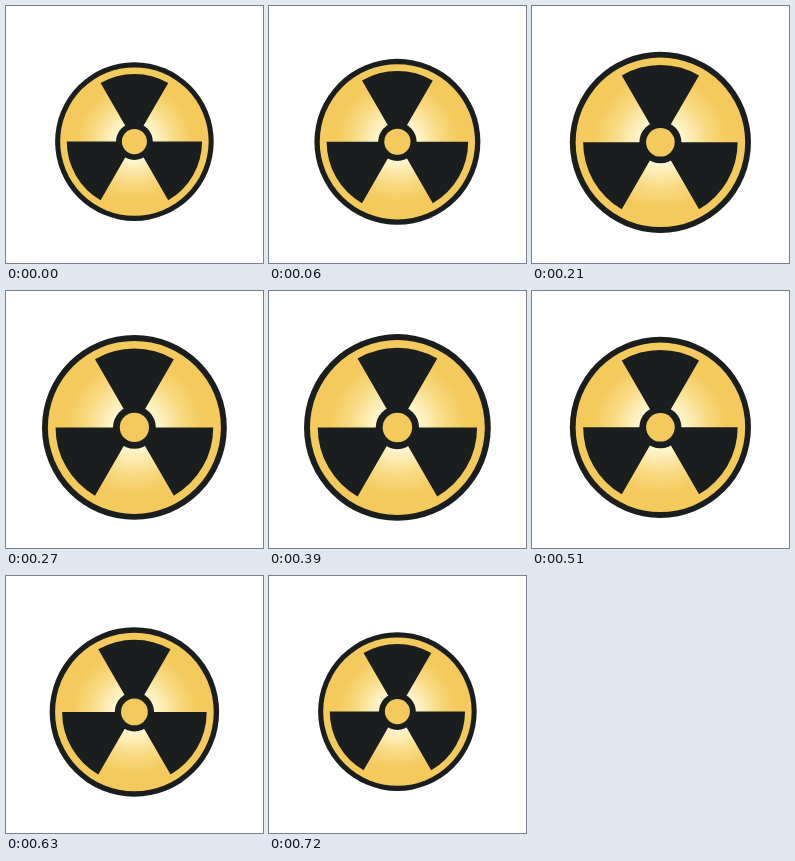
Write an HTML page that moves like this. It is 257 px wide and 257 px high and loops after 750 ms.

```html
<!DOCTYPE html>
<html lang="en">
<head>
<meta charset="utf-8">
<title>Pulsing hazard sign</title>
<style>
html, body { margin: 0; width: 100%; height: 100%; overflow: hidden; background: #fff; }
svg { display: block; width: 100vw; height: 100vh; }
</style>
</head>
<body>
<svg viewBox="0 0 257 257">
  <defs>
    <radialGradient id="glow" gradientUnits="userSpaceOnUse" cx="0" cy="0" r="94">
      <stop offset="0.18" stop-color="#fffbe2"/>
      <stop offset="0.32" stop-color="#fdf0bd"/>
      <stop offset="0.55" stop-color="#f8da82"/>
      <stop offset="0.78" stop-color="#f4ca5c"/>
    </radialGradient>
  </defs>
  <!-- drawn for an outer radius of 100 -->
  <g id="sign" fill="#1a1e1e">
    <circle r="100"/>
    <circle r="93.6" fill="url(#glow)"/>
    <path id="blades"/>
    <circle r="23.2"/>
    <circle r="15.8" fill="#f4ca5c"/>
  </g>
</svg>
<script>
const LOOP = 750, STEP = 30, SWELL = 720;
const sign = document.getElementById('sign');

function blade(start, r) {
  const at = deg => {
    const a = deg * Math.PI / 180;
    return `${(r * Math.cos(a)).toFixed(3)} ${(r * Math.sin(a)).toFixed(3)}`;
  };
  return `M0 0L${at(start)}A${r} ${r} 0 0 1 ${at(start + 60)}Z`;
}

document.getElementById('blades')
  .setAttribute('d', [0, 120, 240].map(a => blade(a, 85.3)).join(''));

function draw(ms) {
  const t = Math.floor((ms % LOOP) / STEP) * STEP;
  const swell = Math.sin(Math.PI * t / SWELL);
  const radius = 79.3 + 14.2 * swell;
  const y = 135.6 + 0.9 * swell;
  sign.setAttribute('transform', `translate(128.4 ${y}) scale(${radius / 100})`);
}

let begin;
function tick(now) {
  begin ??= now;
  draw(Math.max(0, now - begin));
  requestAnimationFrame(tick);
}
draw(0);
requestAnimationFrame(tick);
</script>
</body>
</html>
```
